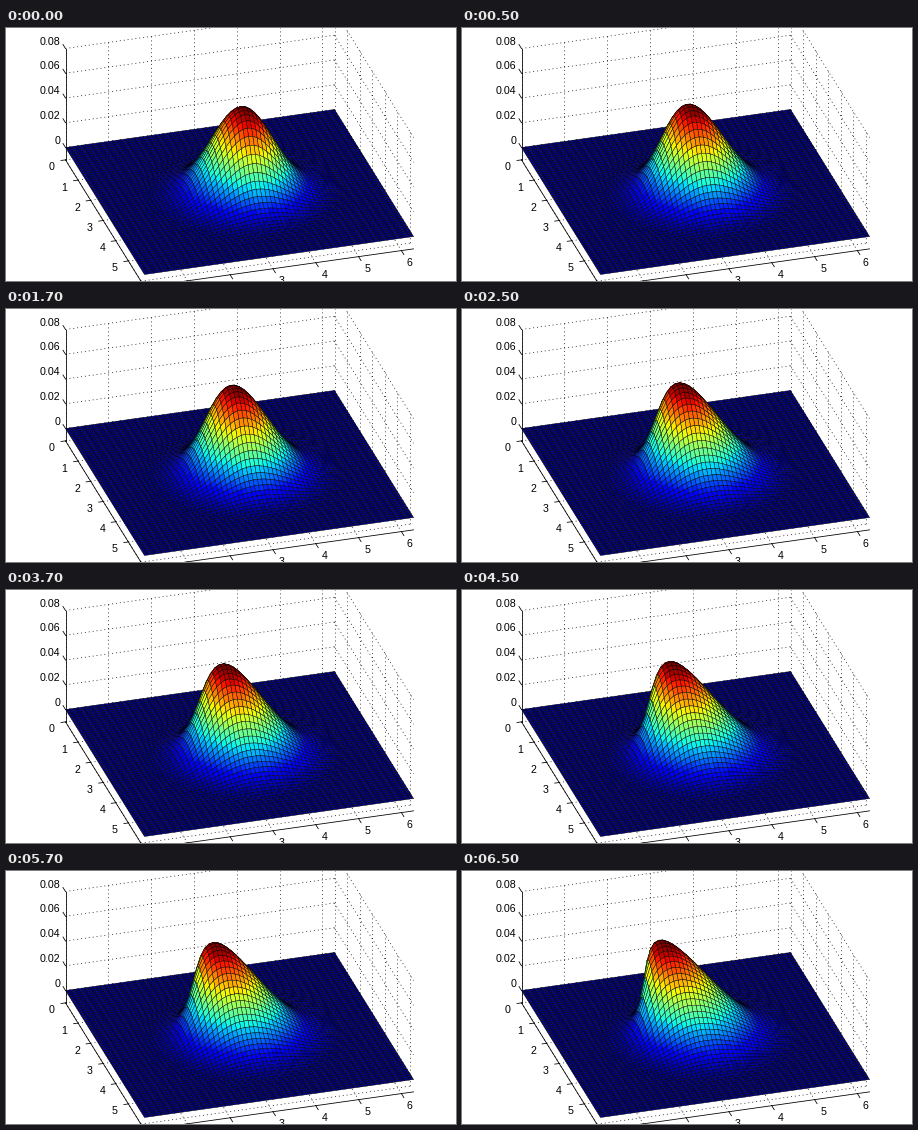
Recreate the animation shown at these times as a matplotlib script. Size 450 by 253 pixels, loop 8 s.

```python
import matplotlib.pyplot as plt
import numpy as np
from matplotlib.animation import FuncAnimation
from matplotlib.collections import PolyCollection

WIDTH, HEIGHT, DPI = 450, 253, 64
PX = 72 / DPI                      # one pixel in points
N = 64                             # surface vertices per side
SPAN = 2 * np.pi
CELL = SPAN / (N - 1)
Z_MIN, Z_MAX, PEAK = -0.01, 0.08, 0.0688
SPEED = 1.7                        # crest travel in cells per pose

plt.rcParams["font.family"] = "Liberation Sans"
fig = plt.figure(figsize=(WIDTH / DPI, HEIGHT / DPI), dpi=DPI, facecolor="white")
ax = fig.add_axes([0, 0, 1, 1])
ax.axis("off")


def project(x, y, z):
    """Orthographic view of the plot box, in pixels."""
    u, v = x / SPAN, y / SPAN
    return np.array([59 + 269 * u + 79 * v,
                     119 - 38 * u + 127 * v - z * 99 / 0.08])


def line(start, end, width=0.8, **style):
    (x0, y0), (x1, y1) = start, end
    ax.plot([x0, x1], [y0, y1], color="black", lw=width * PX, **style)


def grid_line(start, end):
    line(project(*start), project(*end), width=0.7,
         linestyle=(0, (1.4, 4.2)), dash_capstyle="butt", zorder=1)


def tick(point, direction, label, offset, align="center"):
    line(point, point + direction, zorder=3)
    ax.text(*(point + offset), label, size=10.6 * PX, ha=align,
            va="center_baseline", color="black", zorder=4)


def draw_box():
    for z in np.arange(0, 0.081, 0.02):
        grid_line((0, 0, z), (SPAN, 0, z))
        grid_line((SPAN, 0, z), (SPAN, SPAN, z))
        tick(project(0, 0, z), (-2.5, -4), f"{z:.2g}", (-5, -8), "right")
    for t in range(7):
        grid_line((t, 0, Z_MAX), (t, 0, Z_MIN))
        grid_line((t, 0, Z_MIN), (t, SPAN, Z_MIN))
        grid_line((SPAN, t, Z_MAX), (SPAN, t, Z_MIN))
        grid_line((0, t, Z_MIN), (SPAN, t, Z_MIN))
        tick(project(t, SPAN, Z_MIN), (2.5, 4), str(t), (8.5, 11.5))
        tick(project(0, t, Z_MIN), (-4.5, 0.6), str(t), (-13.5, 6.5))

    corner = project(0, 0, Z_MIN)
    front = project(0, SPAN, Z_MIN)
    line(project(0, 0, Z_MAX), corner, zorder=3)
    line(corner, front, zorder=3)
    line(front, project(SPAN, SPAN, Z_MIN), zorder=3)


rows, cols = np.mgrid[0:N, 0:N]
jet = plt.get_cmap("jet", 64)


def height(shift):
    """Gaussian whose points move diagonally in proportion to their height."""
    h = np.zeros((N, N))
    for _ in range(80):
        dx = cols - N / 2 + shift * h
        dy = rows - N / 2 + shift * h
        h = np.exp(-(dx ** 2 + dy ** 2) * CELL ** 2)
    return h


def surface(shift):
    h = height(shift)
    p = np.moveaxis(project(cols * CELL, rows * CELL, h * PEAK), 0, -1)
    quads = np.stack([p[:-1, :-1], p[:-1, 1:], p[1:, 1:], p[1:, :-1]], axis=2)
    # Far to near: rows forward, columns right to left.
    quads = quads[:, ::-1].reshape(-1, 4, 2)
    colors = jet((h / h.max())[:-1, :-1][:, ::-1].ravel())
    return quads, colors


poses = [surface(SPEED * k) for k in range(5)]
mesh = PolyCollection(poses[0][0], facecolors=poses[0][1], edgecolors="black",
                      linewidths=0.42 * PX, zorder=2)
ax.add_collection(mesh, autolim=False)
draw_box()
ax.set_xlim(-0.5, WIDTH - 0.5)
ax.set_ylim(HEIGHT - 0.5, -0.5)


def update(frame):
    # The first pose lasts one step, the later ones four steps each.
    quads, colors = poses[(frame + 3) // 4]
    mesh.set_verts(quads)
    mesh.set_facecolor(colors)
    return [mesh]


animation = FuncAnimation(fig, update, frames=16, interval=500,
                          repeat=True, repeat_delay=0, blit=False)
plt.show()
```
